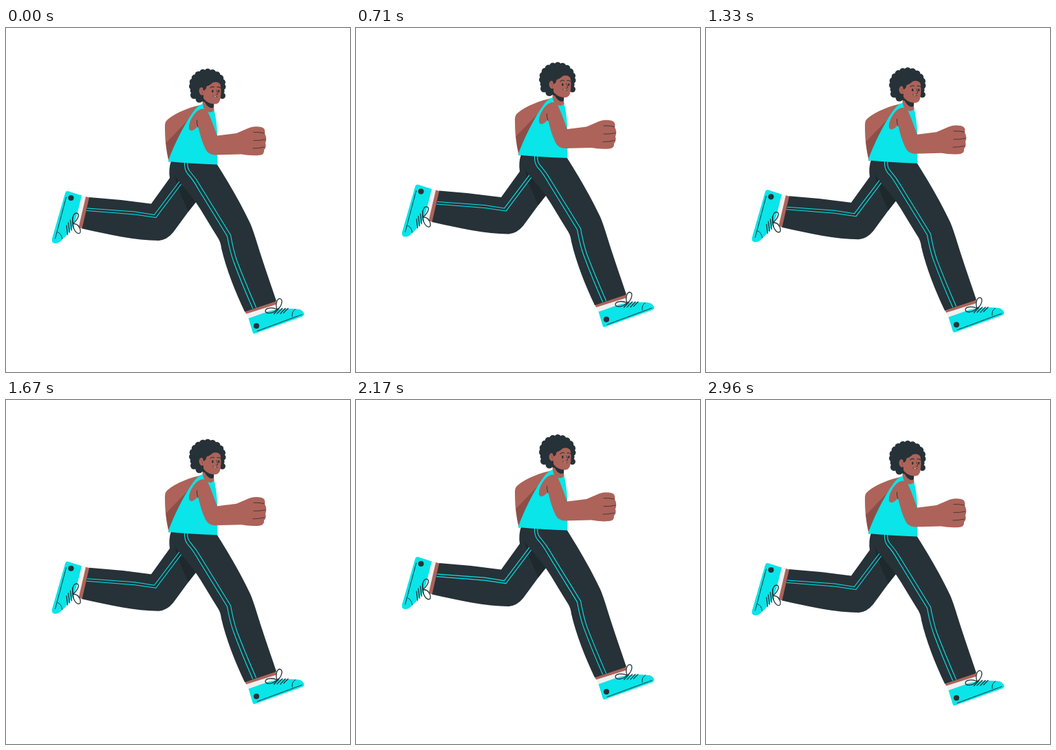
Animation of 500x500 px, one loop 3 s. Source, as an HTML page with a canvas:

```html
<!DOCTYPE html>
<html lang="en">
<head>
<meta charset="utf-8">
<title>Runner</title>
<style>
  html, body { margin: 0; width: 100%; height: 100%; overflow: hidden; background: #fff; }
  canvas { display: block; width: 100vw; height: 100vh; }
</style>
</head>
<body>
<canvas id="stage"></canvas>
<script>
const SIZE = 500, LOOP = 3000, BOB = 1500, RISE = 10, FPS = 24;
const SKIN = '#ad6359', SHADE = '#8b4f48', DARK = '#263238', DEEP = '#1e282d',
      TEAL = '#09e5e8', SOCK = '#f0f0f0';

const canvas = document.getElementById('stage');
const ctx = canvas.getContext('2d');

function fill(color, d) {
  ctx.fillStyle = color;
  ctx.fill(new Path2D(d));
}

function line(color, width, d) {
  ctx.strokeStyle = color;
  ctx.lineWidth = width;
  ctx.stroke(new Path2D(d));
}

function oval(color, x, y, rx, ry = rx, turn = 0) {
  ctx.fillStyle = color;
  ctx.beginPath();
  ctx.ellipse(x, y, rx, ry, turn, 0, Math.PI * 2);
  ctx.fill();
}

function backArm() {
  fill(SKIN, 'M286 111 C268 115 248 122 235 133 Q231 136 231 142 C231 160 232 176 237 195 L262 180 L290 122Z');
  fill(SHADE, 'M272 126 L232.500 167 Q234 182 237 195 L256 180Z');
}

function backFoot() {
  fill(SKIN, 'M114 244.500 L121.500 246.500 L111 291.500 L105 289.500Z');
  fill(SOCK, 'M109 243 L116 245 L106 288 L98 284Z');
  fill(TEAL, 'M90 237 L110 243.500 L104.500 266 Q102 278 97 288 C91 299 84 306 78 311 Q74 314 69 312.500 Q66 311 67 306 L86 240 Q87 236.500 90 237Z');
  oval(DARK, 94.500, 247, 4.100);
  line(DARK, 1, 'M87.500 246 L71.500 306 M75 296.500 Q81 299 81.500 306.500');
  line(DARK, 1.300, 'M88 287 L89.500 300 M90.500 283 L92.500 297 M93.500 279.500 L95.500 294 M96.500 276 L98 290');
  line(DARK, 1.300, 'M97 285 C96 278 97 270 102 269 C107 269 107 276 97 285 C104 283 109 291 108 297 C105 302 98 295 97 285');
}

function frontFoot() {
  fill(SOCK, 'M349 414 L393 401 L391 410 L353 424Z');
  fill(SKIN, 'M347 411 L392 396.500 L393.500 401.500 L349 415.500Z');
  fill(TEAL, 'M352.500 422 L378 413 C392 408 412 407 427 409 Q432 411 433.500 415.500 Q433 418.500 429 420 L362 444 Q359.500 445 358.500 442Z');
  oval(DARK, 364, 433, 4.100);
  line(DARK, 1, 'M365 440.500 L430 416.500 M416 419.500 Q415 412 420.500 409');
  line(DARK, 1.300, 'M389.500 415.500 L397 407.500 M394 415 L401.500 407.500 M399 415 L406 407.500 M403.500 414 L410 407.500');
  line(DARK, 1.300, 'M394 409 C391 401 394 393 398.500 393.500 C403 395 401 405 394 409 C387 416 378 415.500 377 411.500 C377 406 388 406 394 409');
}

function legs() {
  fill(DARK, 'M240 193 Q236 205 238 218 L211 255.500 Q166 249 121 246 L110.500 291.500 C148 300 189 309 222 309 Q234 308 243 297 L276 252 L290 220Z');
  fill(DEEP, 'M243 200 Q246 224 254 242 L265 267 L277 252Z');
  line(TEAL, 1.100, 'M118.500 262 L187 267 L215.500 271.500 L252.500 222.500');
  line(TEAL, 1.100, 'M117.500 265.500 L187 271 L218 275.500 L254.500 227');

  fill(DARK, 'M240 193 L306 197 C320 219 340 252 355 284 Q359 293 366 316 C375 345 384 370 393 397 L347 412.500 C333 383 320 350 313 320 Q312 311 308 305 C296 286 286 268 275 252 C262 235 250 222 246 215 Q241 205 240 193Z');
  line(TEAL, 1.100, 'M259.500 195 Q259 206 264 212 C271 219 275 226 280 235 L321.500 302.500 Q325.500 325 331 340 Q342 370 358.500 407.500');
  line(TEAL, 1.100, 'M264 195.500 Q263 203 267 208 C274 216 279 223 284 232 L326.500 301 Q330.500 323 335.500 338 Q347 368 363.500 406');
}

function torso() {
  fill(SKIN, 'M286 96 L285.500 112 Q285 126 295 126 Q303 125 302.500 119 L301 104Z');
  fill(DARK, 'M287 102 Q289 111 295 115 Q299 117.500 302 115 L302.500 107Z');
  fill(TEAL, 'M286 110.500 Q287 122 297 122.500 Q301 122 302.500 119 C305 129 307 143 307 156 L307.500 198.500 Q270 197 235.500 194 C244 170 258 142 272 122 Q278 113.500 284 111Z');
}

function frontArm() {
  fill(SKIN, 'M286 117.500 C276 118 267 133 266 143 Q265 150 271 149 Q276 147 279 142 C282 155 285 166 290 176 Q294 184 303 184.500 L342 183.500 Q354 186 368 185 Q376 184 375 177.500 Q379 173 377 167.500 Q380 160 376 153.500 Q378 146 371 144 Q359 141.500 349 147 L335 153 L307 156.500 C303 146 299 134 294 123 Q290 117 286 117.500Z');
  line(DARK, 0.900, 'M277.500 134 Q277 139 279 144');
  line(DARK, 0.800, 'M360 151.500 Q368 151 376 153 M360 163.500 Q369 164 377 162 M359 175 Q368 175 375.500 173');
}

function head() {
  oval(DARK, 292, 83, 23, 20);
  // curls around the edge of the hair
  for (let i = 0; i < 19; i++) {
    const a = i / 19 * Math.PI * 2 + 0.1;
    oval(DARK, 292.800 + 21.800 * Math.cos(a), 83.500 + 19.500 * Math.sin(a), 5);
  }
  oval(DARK, 273.500, 97.500, 5.500);
  oval(DARK, 281, 103, 5.500);
  oval(DARK, 314.500, 98.500, 4.500);
  fill(SKIN, 'M287 86 C292 85 297 82 301 79 Q308 77 311.500 82 Q313.500 91 311.500 103 Q310 111 303 110.500 C296 110 290 107 287 102Z');
  oval(SKIN, 284.500, 92, 3.800, 5.800, -0.15);
  line(SHADE, 0.800, 'M282.500 89 Q286 90 285.500 95');
  fill(DARK, 'M285 82 Q294 75 303 76 Q298 83 291.500 84.500 Q291 90 287 91Z');
  oval(DARK, 300.300, 91.800, 1.300, 2.100);
  oval(DARK, 309.300, 91.800, 1.200, 2.100);
  line(DARK, 1.100, 'M297 87 Q299.500 84.500 302.500 86 M307 86 Q309.500 85 311.500 87');
  line(DARK, 0.800, 'M306 90 Q308 95 307.500 96.500 L305.500 97');
  fill('#fff', 'M301.500 98.800 L306 99.800 Q303.500 102 301.500 98.800Z');
  line(DARK, 0.800, 'M300.500 98.500 Q303 101.500 307 100');
}

function bob(ms) {
  const step = Math.floor((ms % LOOP + 4) * FPS / 1000) + 0.5;
  const p = (step * 1000 / FPS % BOB) / BOB;
  return 0.27 - RISE * (1 - Math.abs(2 * p - 1));
}

function draw() {
  const dpr = window.devicePixelRatio || 1;
  const w = Math.round(innerWidth * dpr), h = Math.round(innerHeight * dpr);
  if (canvas.width !== w || canvas.height !== h) {
    canvas.width = w;
    canvas.height = h;
  }
  ctx.setTransform(w / SIZE, 0, 0, h / SIZE, 0, 0);
  ctx.fillStyle = '#fff';
  ctx.fillRect(0, 0, SIZE, SIZE);
  ctx.lineCap = ctx.lineJoin = 'round';
  ctx.translate(0, bob(performance.now()));
  backArm();
  backFoot();
  frontFoot();
  legs();
  torso();
  frontArm();
  head();
  requestAnimationFrame(draw);
}

draw();
</script>
</body>
</html>
```
